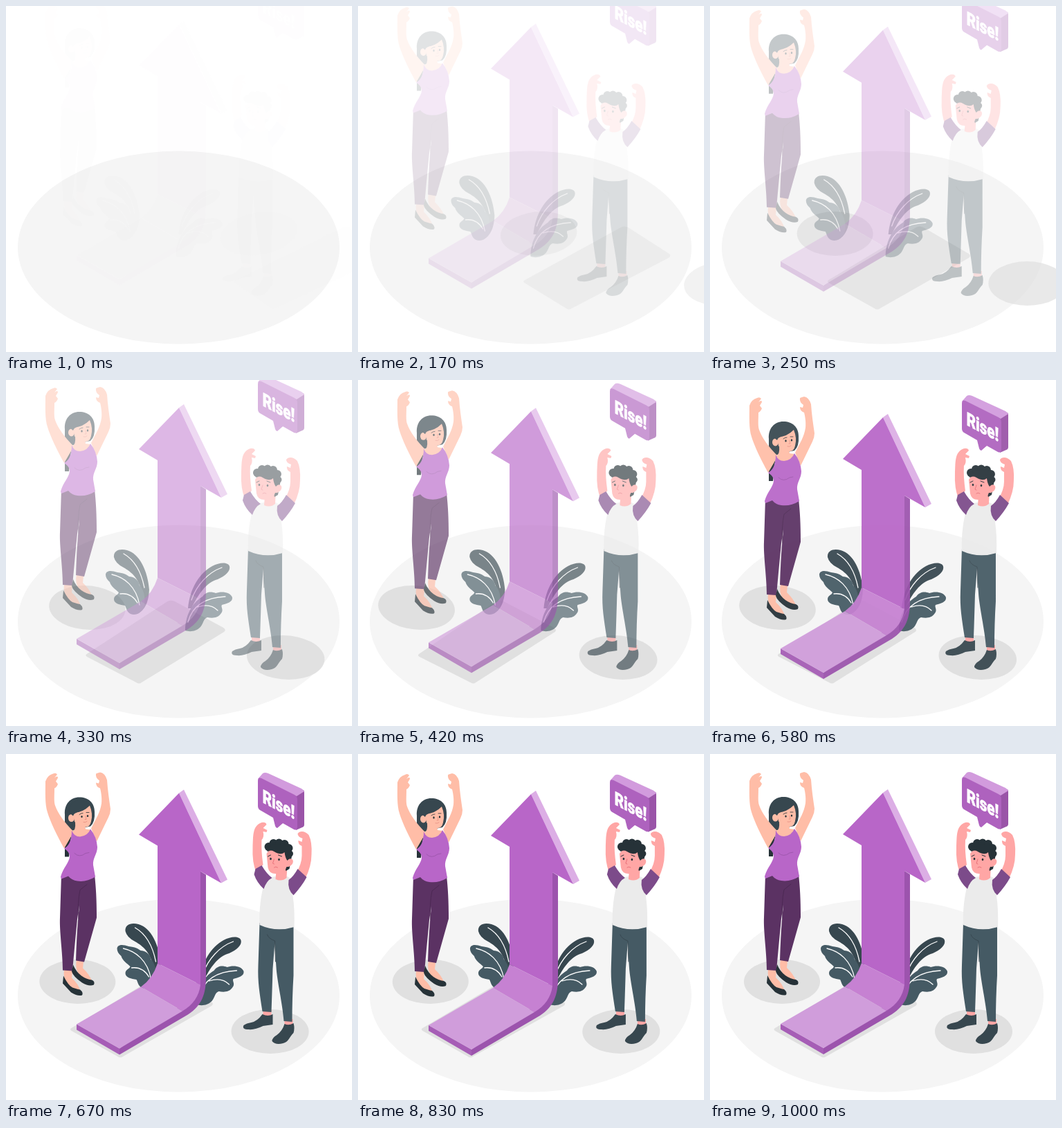
Animation, 500 px wide and 500 px high, one loop 1.04 s. Source, as an HTML page:

```html
<!DOCTYPE html>
<html>
<head>
<meta charset="utf-8">
<title>Rise</title>
<style>
html, body { margin: 0; width: 100%; height: 100%; overflow: hidden; background: #fff; }
svg { display: block; width: 100vw; height: 100vh; }
.line { fill: none; stroke-linecap: round; stroke-linejoin: round; }
text { font: 900 27px Roboto, sans-serif; fill: #fff; stroke: #fff; stroke-width: .7; stroke-linejoin: round; }
</style>
</head>
<body>
<svg viewBox="0 0 500 500">
<ellipse cx="249.5" cy="349" rx="232.5" ry="139.5" fill="#f5f5f5"/>

<g id="shadows" fill="#e0e0e0">
  <ellipse cx="104" cy="329" rx="55" ry="32"/>
  <ellipse cx="381" cy="401" rx="56" ry="32"/>
  <path d="M94 396L221 320Q226 317 232 320L297 358Q301 361 297 364L168 437Q164 440 160 437L94 400Q91 398 94 396Z"/>
</g>

<g id="plants">
  <path fill="#37474f" d="M172 256C171 246 181 243 191 246C209 251 221 276 223 303Q222 330 206 338L212 305C207 286 198 278 186 271Q174 265 172 256Z"/>
  <path fill="#455a64" d="M160 281C161 275 168 275 177 278C186 279 190 281 194 284C204 285 208 291 209 297C217 304 218 320 215 330Q206 342 196 338C190 335 190 329 188 326C181 325 172 323 172 317C172 311 178 311 179 307C174 302 168 299 166 292Q160 287 160 281Z"/>
  <path fill="#37474f" d="M279 330C282 300 296 279 314 269C325 263 337 263 339 269C341 276 333 283 322 288C305 293 295 308 284 330Z"/>
  <path fill="#455a64" d="M275 362C275 343 283 323 300 313C306 305 313 306 319 308C327 305 340 306 343 314C344 321 335 323 328 325C326 328 331 332 327 337C322 345 313 344 307 343C301 345 302 351 297 357C290 364 281 364 275 362Z"/>
  <g class="line" stroke="#fff" stroke-width="1.3">
    <path d="M186 251C200 259 211 275 216 300"/>
    <path d="M169 281C187 285 204 298 209 325M181 309Q197 307 206 322"/>
    <path d="M284 318C291 297 308 278 328 271"/>
    <path d="M279 350C285 326 305 314 333 313M293 328Q311 322 322 333"/>
  </g>
</g>

<g id="arrow">
  <path fill="#9c54ad" d="M281 169L289 174V322C289 346 283 363 263 376L164 434L164 425L250 365L275 330Z"/>
  <path fill="#a65db6" d="M102 390L164 425V434L102 398Z"/>
  <path fill="#dcaee5" d="M250 56L257 51L320 181L311 186Z"/>
  <path fill="#b866c8" d="M250 56L311 186L281 169V333L219 302V132L192 116Z"/>
  <path fill="#c681d2" d="M219 302L281 333C279 350 270 362 255 371L195 336Q212 324 219 302Z"/>
  <path fill="#d09ddb" d="M195 336L255 371L164 425L102 390Z"/>
</g>

<g id="woman">
  <path fill="#263238" d="M85 90H96V112L93 125L91 148H85Z"/>
  <path fill="#37474f" d="M85 110V87C84 72 93 62 106 62C119 62 128 70 128 83Q129 98 122 104L112 106L97 110Z"/>
  <g fill="#ffbda7">
    <path d="M68 28Q72 26 74 29L70 34Q75 30 75 34L72 39L75 43Q73 48 70 49C70 60 69 68 71 74Q77 91 98 112L84 136C73 116 64 97 60 84C56 72 57 54 57 39Q60 30 68 28Z"/>
    <path d="M136 26Q143 27 146 37C147 52 149 65 151 79Q151 85 148 91L131 126L123 107C130 93 136 84 138 71C139 62 137 53 136 49Q130 47 130 41L134 42L135 38Q129 34 130 28Q132 27 136 26Z"/>
    <path d="M100 98L114 102L115 108L123 109L118 124H94L96 111Q101 110 100 98Z"/>
    <path d="M97 84Q110 85 121 74Q126 86 123 97Q121 106 114 105Q103 104 99 97Z"/>
    <ellipse cx="94.5" cy="92" rx="4.5" ry="5.5"/>
    <path d="M84 311L96 312L95 323Q105 332 108 343Q100 344 90 333Q82 324 84 311Z"/>
    <path d="M102 297L112 299L111 309Q120 317 125 329Q116 331 106 319Q99 309 102 297Z"/>
  </g>
  <path fill="#37474f" d="M97 89C99 82 112 84 121 73Q117 65 105 66Q92 69 91 84Z"/>
  <path fill="#5b3263" d="M80 174L128 174C130 192 131 210 131 236L113 300L101 298Q102 265 104 240L106 218L103 238Q99 279 96 313L82 312C82 287 77 255 78 236Z"/>
  <path class="line" stroke="#482650" stroke-width=".8" d="M105 238Q103 215 107 196L117 188"/>
  <path fill="#b866c8" d="M95 110Q98 119 107 119Q118 118 122 108Q131 119 132 134C132 144 125 150 126 160L129 177Q116 185 103 183Q95 182 90 176L80 180L79 177C83 163 91 157 92 148Q92 141 84 136Q95 130 95 110Z"/>
  <path class="line" stroke="#9853a8" stroke-width=".8" d="M99 143Q106 150 115 143L120 142"/>
  <g fill="#263238">
    <ellipse cx="109.5" cy="90" rx="1.2" ry="1.6"/>
    <ellipse cx="118" cy="89" rx="1.2" ry="1.6"/>
    <path d="M83 320Q90 334 96 337Q105 340 107 340Q112 344 110 348Q104 350 94 344L82 331Z"/>
    <path d="M97 304Q101 314 109 320Q116 325 124 326Q129 328 127 333Q120 336 110 330Q97 321 95 314Z"/>
  </g>
  <g class="line" stroke="#263238" stroke-width=".8">
    <path d="M106 87Q108 85 111 85M116 84L120 84"/>
    <path stroke="#e58d80" d="M115 89L116 94L114 94M112 98Q115 99 117 97"/>
  </g>
</g>

<g id="man">
  <g fill="#ffa6a5">
    <path d="M369 99Q375 98 376 102L371 107L377 110L376 113L371 112Q373 120 369 124Q368 139 371 160L361 171Q355 156 356 135C357 119 355 104 369 99Z"/>
    <path d="M423 113Q430 110 437 117Q442 127 441 145Q441 162 432 180L419 172Q427 158 427 147L427 133Q421 130 422 125L427 127L428 122Q421 120 421 115Z"/>
    <path d="M371 370H383V380H371ZM402 383H414V393H402Z"/>
  </g>
  <path fill="#455a64" d="M366 244L415 245L415 320Q413 352 413 387L401 386C399 360 391 327 390 308Q389 295 388 272L385 310Q384 345 383 373L370 372C366 345 363 330 364 305Z"/>
  <path class="line" stroke="#37474f" stroke-width=".9" d="M389 300L388 270Q379 267 377 261"/>
  <path fill="#ebebeb" d="M373 186Q378 178 388 177H406Q413 180 415 188L414 205Q417 225 416 250Q390 258 366 247C365 225 368 202 373 186Z"/>
  <path fill="#7c4b8a" d="M360 166L369 161Q376 173 384 179Q376 183 372 195Q362 186 358 174ZM421 166L434 178Q427 191 415 204Q406 196 408 182Q415 177 421 166Z"/>
  <path fill="#ffa6a5" d="M390 168L406 160L405 179Q398 185 389 181Z"/>
  <g fill="#263238">
    <circle cx="379" cy="134" r="6"/><circle cx="386" cy="129" r="6"/>
    <circle cx="394" cy="128" r="5.5"/><circle cx="402" cy="130" r="6"/>
    <circle cx="408" cy="136" r="6"/><circle cx="410" cy="144" r="4.5"/>
    <path d="M376 140L386 130L405 132L413 145L409 166L404 169L398 147Z"/>
  </g>
  <g fill="#37474f">
    <path d="M370 376Q378 380 385 376L385 391L371 393Q359 399 350 398Q340 398 343 392Q347 389 354 388Q363 386 370 376Z"/>
    <path d="M402 390Q408 393 415 389Q417 396 415 403C409 409 408 416 400 418Q389 421 384 415Q384 410 391 406Q399 400 402 390Z"/>
  </g>
  <path fill="#ffa6a5" d="M376 144Q380 137 387 141Q397 147 402 142Q403 150 406 154Q410 149 414 153Q416 159 408 163L405 163Q403 172 391 173Q380 174 378 164Z"/>
  <g fill="#263238">
    <ellipse cx="382" cy="151.5" rx="1.3" ry="1.8"/>
    <ellipse cx="394" cy="152.5" rx="1.3" ry="1.8"/>
  </g>
  <g class="line" stroke="#263238" stroke-width="1">
    <path d="M378 148L382 146M393 146L398 148"/>
    <path stroke="#e8737b" d="M387 152L385 158L387 159M387 164Q389 162 392 164"/>
  </g>
</g>

<g id="bubble">
  <path fill="#9a54a8" d="M418 59L430 51Q431 52 431 55V101Q431 104 428 105L419 109Z"/>
  <path fill="#d29bdd" d="M364 35L371 27Q374 25 379 27L427 49Q430 51 431 53L420 60L366 37Z"/>
  <path fill="#9a54a8" d="M392 105L405 95L399 91Z"/>
  <path fill="#ae62be" d="M364 38Q364 32 369 34L417 58Q421 60 421 65V104Q421 110 416 108L400 99L392 106Q390 106 389 103L386 91L367 80Q364 78 364 74Z"/>
  <text transform="matrix(.76 .4 0 1 370.7 69)">Rise!</text>
</g>
</svg>
<script>
const LOOP = 1040, FPS = 24, LEAD = 0.034;
const part = id => document.getElementById(id);
const mix = (a, b, p) => a + (b - a) * p;
const tan = deg => Math.tan(deg * Math.PI / 180);
const cubic = (a, b, s) => 3 * (1 - s) ** 2 * s * a + 3 * (1 - s) * s * s * b + s ** 3;

// cubic-bezier(.36, -.01, .5, 1.38): overshoots, then settles
function ease(x) {
  if (x >= 1) return 1;
  let lo = 0, hi = 1;
  for (let i = 0; i < 30; i++) {
    const mid = (lo + hi) / 2;
    if (cubic(.36, .5, mid) < x) lo = mid; else hi = mid;
  }
  return cubic(-.01, 1.38, lo);
}

function place(id, transform, opacity) {
  part(id).setAttribute('transform', transform);
  part(id).setAttribute('opacity', Math.max(0, Math.min(1, opacity)));
}

function slide(id, dx, dy, p) {
  place(id, `translate(${dx * (1 - p)} ${dy * (1 - p)})`, p);
}

// Fast entrance from the right, leaning back and forth about y = 367
function rush(id, t) {
  let x = 0, lean, alpha = 1;
  if (t < .6) {
    const p = ease(t / .6);
    x = 250 * (1 - p);
    lean = mix(tan(-20), tan(10), p);
    alpha = p;
  } else if (t < .8) {
    lean = mix(tan(10), tan(-2), ease((t - .6) / .2));
  } else {
    lean = mix(tan(-2), 0, ease((t - .8) / .2));
  }
  place(id, `matrix(1 0 ${lean} 1 ${x - 367 * lean} 0)`, alpha);
}

function draw() {
  const step = Math.floor((performance.now() % LOOP + 5) * FPS / 1000);
  const t = Math.min(1, (step < 2 ? 0 : step / FPS) + LEAD);
  const p = ease(t);
  rush('shadows', t);
  slide('plants', -30, 0, p);
  slide('arrow', 0, -30, p);
  slide('woman', 0, -30, p);
  slide('man', -30, 0, p);
  slide('bubble', 0, -60, p);
  requestAnimationFrame(draw);
}
draw();
</script>
</body>
</html>
```
